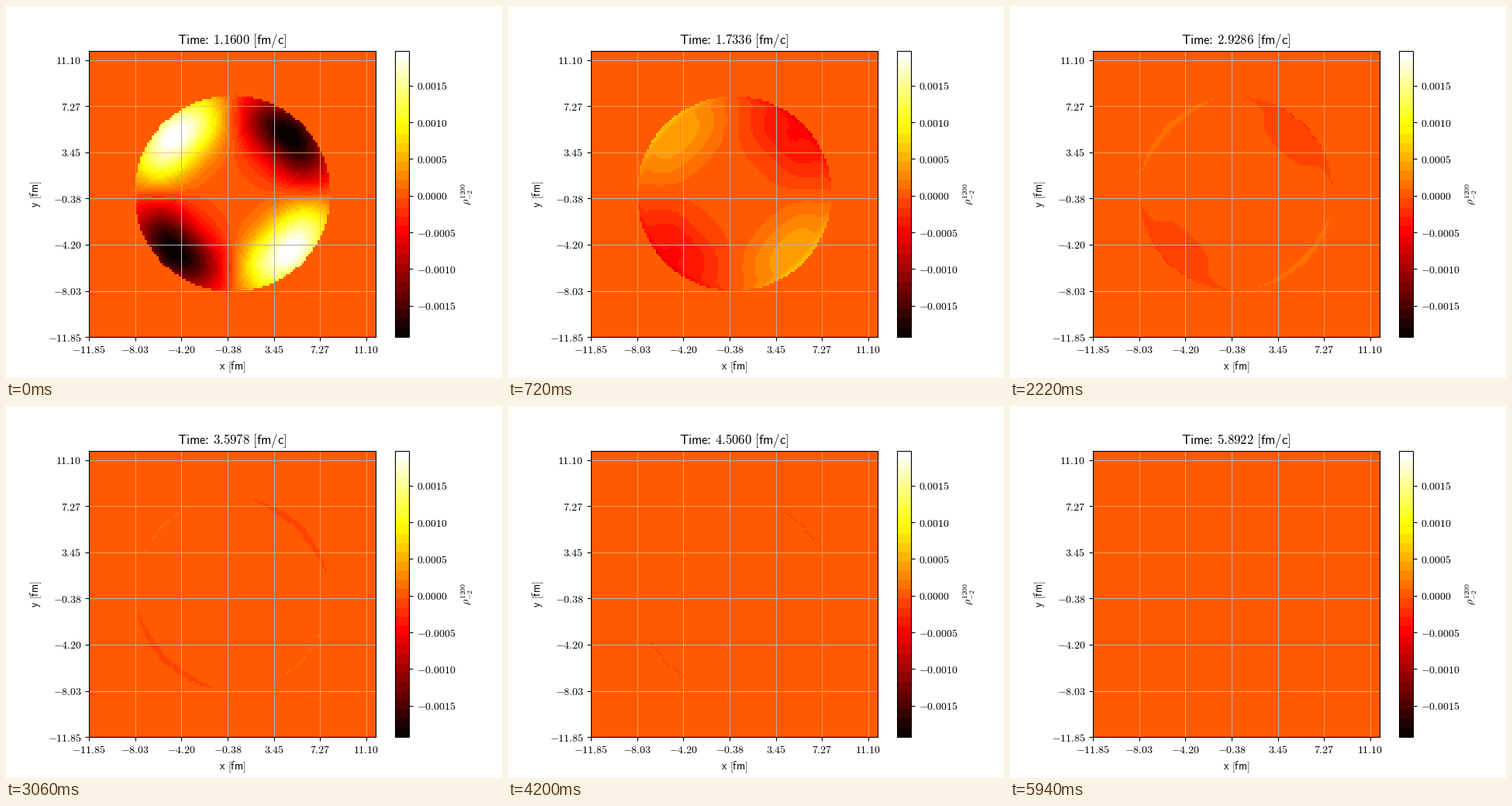
Write a matplotlib script that moves like this. It is 640 px wide and 480 px high and loops after 6000 ms.

```python
import matplotlib.pyplot as plt
import numpy as np
from matplotlib.animation import FuncAnimation

plt.rcParams["mathtext.fontset"] = "cm"

CELLS = 124
FRAMES = 100
T0, DT = 1.16, 0.0478
VMIN, VMAX = -0.00193, 0.00198
PEAK_R, PEAK_W, RIM_W = 34.9, 9.4, 1.5  # in cells

axis = np.arange(CELLS) + 0.5 - CELLS / 2
X, Y = np.meshgrid(axis, axis)
R = np.hypot(X, Y)
ANGULAR = -2 * X * Y / R**2
LOBES = np.where(ANGULAR > 0, VMAX, -VMIN) * ANGULAR
BULK = np.exp(-0.5 * ((R - PEAK_R) / PEAK_W) ** 2)


def time_at(n):
    return T0 + DT * n


def density(n):
    """Decaying quadrupole inside a slowly shrinking disk with a growing rim."""
    t = time_at(n)
    edge = 42.05 + 0.5 * np.exp(-n / 10) - 0.004 * n
    rim_gain = 4.2 * (1 - np.exp(-(((t - T0) / 1.5) ** 1.4)))
    rim = rim_gain * np.exp(np.minimum(R - edge, 0) / RIM_W)
    field = LOBES * (T0 / t) ** 3.8 * (BULK + rim)
    return np.where(R <= edge, field, 0)


def sans(text):
    body = text.replace(": ", r"\hspace{-0.2}:\hspace{0.18}")
    return r"$\mathsf{" + body.replace(" ", r"\hspace{0.38}") + "}$"


def title_at(n):
    return sans(f"Time: {time_at(n):.4f} [fm/c]")


fig, ax = plt.subplots(figsize=(6.4, 4.8), dpi=100)
image = ax.imshow(
    density(0),
    cmap=plt.get_cmap("hot", 31),
    vmin=VMIN,
    vmax=VMAX,
    origin="lower",
    extent=(0, CELLS, 0, CELLS),
    interpolation="nearest",
)

ticks = np.arange(0, CELLS, 20)
labels = [f"${-11.85 + 0.19121 * k:.2f}$" for k in ticks]
ax.set_xticks(ticks, labels)
ax.set_yticks(ticks, labels)
ax.set_xlabel(sans("x [fm]"))
ax.set_ylabel(sans("y [fm]"))
ax.grid(True, color="#b0b0b0", linewidth=0.8)

# Some grid lines take on a warm tint
for lines, warm in ((ax.get_xgridlines(), (1, 5, 6)), (ax.get_ygridlines(), (4, 5))):
    for k in warm:
        lines[k].set(color="#ffb070", alpha=0.7)

bar = fig.colorbar(image, ax=ax)
bar_ticks = np.arange(-3, 4) * 0.0005
bar.set_ticks(bar_ticks, labels=[f"${v:.4f}$" for v in bar_ticks])
bar.set_label(r"$\rho^{1200}_{-2}$")

title = ax.set_title(title_at(0))


def update(n):
    image.set_data(density(n))
    title.set_text(title_at(n))
    return image, title


anim = FuncAnimation(
    fig, update, frames=FRAMES, interval=60, repeat=True, repeat_delay=0, blit=False
)
plt.show()
```
